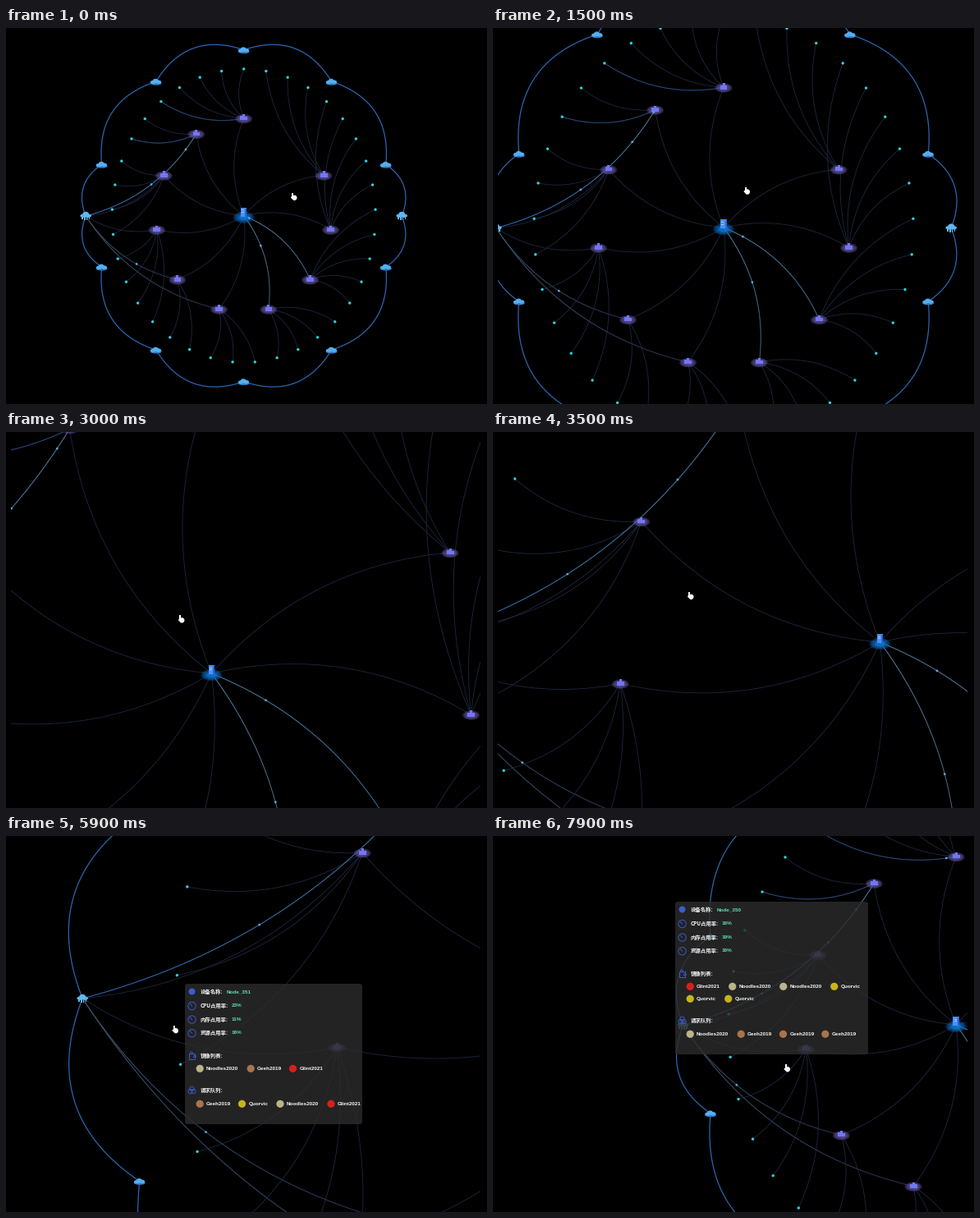
Write a matplotlib script that moves like this. It is 586 px wide and 458 px high and loops after 8000 ms.

```python
import numpy as np
import matplotlib.pyplot as plt
from matplotlib.animation import FuncAnimation
from matplotlib.collections import LineCollection, PolyCollection
from matplotlib.colors import to_rgba
from matplotlib.patches import Circle, FancyBboxPatch, Rectangle
from matplotlib.transforms import Affine2D

W, H, DPI = 586, 458, 100
STEP, FRAMES = 100, 80
PX = 72 / DPI

fig = plt.figure(figsize=(W / DPI, H / DPI), dpi=DPI, facecolor="black")
ax = fig.add_axes([0, 0, 1, 1])
ax.set_xlim(0, W)
ax.set_ylim(H, 0)
ax.axis("off")


# ---- network layout, relative to the hub at scale 1 ----
def ring(n, rx, ry):
    a = 2 * np.pi * np.arange(n) / n
    return np.column_stack([rx * np.sin(a), -ry * np.cos(a)])


def curve(p, q, bend=0.2, n=40):
    """Quadratic curve from p to q, bulging by bend times its length."""
    d = q - p
    c = (p + q) / 2 + bend * np.array([d[1], -d[0]])
    t = np.linspace(0, 1, n)[:, None]
    return p * (1 - t) ** 2 + 2 * c * t * (1 - t) + q * t ** 2


HUB = np.zeros(2)
clouds = ring(10, 182, 202)
nodes = ring(11, 107, 118.6)
leaves = ring(37, 160.5, 178.8)
left, right = np.array([-192.5, 0.3]), np.array([192.5, 0.3])
used = [0, *range(2, 11)]

rim = [*clouds[:3], right, *clouds[3:8], left, *clouds[8:]]
outer = [curve(p, q, 0.4) for p, q in zip(rim, rim[1:] + rim[:1])]

# leaves are shared out clockwise from the top
owner = np.repeat(used[1:] + [0], [3, 5, 5, 4, 3, 2, 4, 4, 2, 5])
fan = [curve(nodes[k], leaves[(j + 1) % 37]) for j, k in enumerate(owner)]
spokes = [curve(HUB, nodes[k]) for k in used]
uplinks = [curve(nodes[k], left) for k in (6, 7, 8, 9, 10)]
faint = fan + spokes + uplinks

TEAL, BLUE, STEEL, NAVY, DIM = "#4d7f99", "#2b68b8", "#3b5468", "#274a7c", "#222b48"
glowing = [(uplinks[4], TEAL, BLUE), (uplinks[1], DIM, STEEL), (uplinks[0], DIM, STEEL),
           (spokes[4], TEAL, STEEL), (spokes[3], TEAL, "#34688f"),
           (fan[32], NAVY, NAVY), (fan[30], NAVY, NAVY)]

# glowing curve, position at start; all run at one speed on screen
pulses = [(0, 0.481), (0, 0.129), (0, -0.047), (1, 0.38), (3, 0.345), (4, 0.06), (5, -0.22)]
SPEED = 8


def lines(color, width, z):
    return ax.add_collection(LineCollection([], colors=color, linewidths=width * PX, zorder=z))


def blend(a, b, n):
    t = np.linspace(0, 1, n)[:, None]
    return np.array(to_rgba(a)) * (1 - t) + np.array(to_rgba(b)) * t


faint_lc = lines("#20273f", 0.85, 1)
outer_lc = lines("#2c66b0", 1.25, 1)
glow_lcs = [lines(blend(a, b, 39), 0.95, 2) for _, a, b in glowing]


# ---- icons: fixed size, made of small polygons ----
def oval(x, y, rx, ry):
    a = np.linspace(0, 2 * np.pi, 25)
    return np.column_stack([x + rx * np.cos(a), y + ry * np.sin(a)])


def rect(x, y, w, h):
    return np.array([(x, y), (x + w, y), (x + w, y + h), (x, y + h)], float)


def icon(points, parts, z=3):
    """Return the places of a repeated icon and its (collection, shape) parts."""
    made = []
    for shape, color, alpha in parts:
        pc = PolyCollection([], facecolors=[to_rgba(color, alpha)],
                            edgecolors="none", zorder=z)
        made.append((ax.add_collection(pc), shape))
    return np.atleast_2d(points), made


def halo(y, rx, color, core):
    """Soft disc seen at an angle, brighter towards the middle."""
    return [(oval(0, y, rx * f, rx * f * 0.55), color if f > 0.6 else core, 0.3)
            for f in np.linspace(1, 0.4, 6)]


cloud = [(oval(0, 2, 7, 2.4), "#2f7ccb", 1)]
cloud += [(oval(x, -1 + 0.5 * abs(x), 3.5, 2.8 - 0.2 * abs(x)), "#56aeee", 1)
          for x in (-3.4, 2.9, -0.5)]
jelly = [(oval(x, -2.4 + 0.7 * abs(x), 3.8, 2.8 - 0.2 * abs(x)), "#62b6f0", 1)
         for x in (-3, 3, 0)]
jelly += [(rect(x - 0.8, 0, 1.6, 5.8 - 0.3 * abs(x)), "#62b6f0", 1)
          for x in np.linspace(-4.4, 4.4, 4)]
town = halo(0.6, 10.6, "#62549c", "#4a45c0")
town += [(rect(x - 1.5, -h, 3, h + 2.2), "#7277f2", 1) for x, h in ((-2.8, 2.8), (0.1, 5), (3, 2.4))]
tower = halo(2, 13, "#0c66bb", "#128ae4")
tower += [(rect(-3.7, -9.8, 7.4, 11), "#4a90fa", 1), (rect(1.7, -9, 2, 10), "#2d66da", 1)]
tower += [(rect(-2.6, y, 3, 1), "#9ccbff", 1) for y in (-7.4, -4.6)]

icons = [icon(leaves, [(oval(0, 0, 1.7, 1.7), "#30d0dc", 1)]), icon(clouds, cloud),
         icon([left, right], jelly), icon(nodes[used], town), icon(HUB, tower, 4)]
pulse_pc = PolyCollection([], facecolors="#5fa8dc", edgecolors="none", zorder=4)
ax.add_collection(pulse_pc)

for x in (5.5 - W, 578):
    ax.add_patch(Rectangle((x, 0), W, H, color="black", lw=0, zorder=5))


# ---- information panel ----
INK, GREEN = "#3b5bd0", "#5fdcae"
# name -> (icon colour, advance)
apps = {"Noodles2020": ("#b9b48a", 62), "Geeh2019": ("#a8744e", 51.3),
        "Glint2021": ("#d81f1f", 51.5), "Quorvic": ("#c9b31c", 46.5)}


class Panel:
    ICON_X, LABEL_X, ITEM_X = 8.5, 18.7, 18.2

    def __init__(self, width, height, name, loads, images, queue):
        self.move = Affine2D()
        self.tr = self.move + ax.transData
        self.parts = []
        self.add(FancyBboxPatch((2, 2), width - 4, height - 4,
                                boxstyle="round,pad=2,rounding_size=3",
                                fc=to_rgba("#2b2b2b", 0.84), ec="none"), 6)
        x = self.ICON_X
        self.disc(x, 9.5, 4, INK)
        self.row(9, "设备名称:", name, 51)
        for i, (what, load) in enumerate(zip(("CPU", "内存", "资源"), loads)):
            y = 26 + 16.6 * i
            self.loop(x, y + 1, 4.7)
            self.stroke([x - 2, x], [y - 1.5, y + 1])
            self.row(y, what + "占用率:", load, 57)
        self.add(Rectangle((x - 4, 85), 7, 7, fc="none", ec=INK, lw=0.9 * PX))
        self.loop(x - 0.5, 84.4, 1.4)
        self.loop(x + 3.4, 88.5, 1.4)
        self.row(87, "镜像列表:")
        for i, names in enumerate(images):
            y = 103 + 15 * i
            self.items(y, names)
        y += 26
        for a in np.radians([90, 210, 330]):
            self.loop(x + 2.2 * np.cos(a), y + 1 - 2.2 * np.sin(a), 2.6)
        self.row(y, "请求队列:")
        self.items(y + 17, queue)

    def add(self, patch, z=7):
        patch.set_transform(self.tr)
        patch.set_zorder(z)
        self.parts.append(ax.add_patch(patch))

    def disc(self, x, y, r, color):
        self.add(Circle((x, y), r, fc=color, ec="none"))

    def loop(self, x, y, r):
        self.add(Circle((x, y), r, fc="none", ec=INK, lw=0.9 * PX))

    def stroke(self, x, y):
        self.parts += ax.plot(x, y, color=INK, lw=0.9 * PX, transform=self.tr, zorder=7)

    def text(self, x, y, s, color="#f2f2f2", font="Liberation Sans"):
        self.parts.append(ax.text(x, y, s, color=color, family=font, size=6.35 * PX,
                                  weight="bold", va="center_baseline",
                                  transform=self.tr, zorder=7))

    def row(self, y, label, value="", x=0):
        self.text(self.LABEL_X, y, label, font="Noto Sans CJK JP")
        self.text(x, y, value, GREEN)

    def items(self, y, names):
        x = self.ITEM_X
        for name in names:
            color, advance = apps[name]
            self.disc(x, y + 0.3, 4.6, color)
            self.text(x + 7.8, y, name)
            x += advance

    def place(self, pos):
        for p in self.parts:
            p.set_visible(pos is not None)
        if pos is not None:
            self.move.clear().translate(*pos)


N, G, F, Q = apps
first = Panel(216, 171, "Node_351", ("23%", "11%", "16%"), [[N, G, F]], [G, Q, N, F])
second = Panel(235, 186, "Node_350", ("16%", "19%", "16%"),
               [[F, N, N, Q], [Q, Q]], [N, G, G, G])

# ---- pointer: gestures drive both the hand and the camera ----
hand = [rect(-2.6, -4.6, 1.9, 7), oval(0.4, 1.4, 3.1, 3.2), oval(-2.4, 1, 1.5, 1.3)]
hand_pc = PolyCollection([], facecolors="white", edgecolors="none", zorder=9)
ax.add_collection(hand_pc)

ZOOM = 1.2
# begin, end, pointer x, y, drag dx, dy, wheel steps (negative zooms out)
gestures = [
    (800, 1000, 309.5, 195.8, 0, 0, 2),
    (2200, 2800, 309.5, 195.8, 0, 0, 4),
    (3050, 3300, 190, 233, 221, -38, 0),
    (3600, 4100, 156, 198, 208, -55.6, 0),
    (4550, 4700, 161.5, 218.4, 0, 0, 1),
    (5300, 6400, 206.5, 233.4, 0, 0, 0),
    (7300, 7600, 360.4, 260.9, 0, 0, -4),
]
stops = [(0, 351, 203)]
for t0, t1, x, y, dx, dy, _ in gestures:
    stops += [(t0, x, y), (t1, x + dx, y + dy)]
stops = np.array(stops + [(7900, 358.5, 280.4)])


def pointer(ms):
    return np.array([np.interp(ms, stops[:, 0], stops[:, k]) for k in (1, 2)])


def camera(ms):
    scale, pos = 1.0, np.array([289.7, 228.7])
    for t0, t1, x, y, dx, dy, steps in gestures:
        pos = pos + np.array([dx, dy]) * np.clip((ms - t0) / (t1 - t0), 0, 1)
        done = np.sum(ms >= np.linspace(t0, t1, abs(steps)))
        f = ZOOM ** (np.sign(steps) * done)
        hot = np.array([x, y])
        scale, pos = scale * f, hot + (pos - hot) * f
    return scale, pos


def travelled(ms):
    """Distance, in layout units, covered at constant screen speed."""
    return sum(SPEED * STEP / 1000 / camera(t)[0] for t in range(0, ms, STEP))


def along(pts, t):
    u = np.linspace(0, 1, len(pts))
    return np.array([np.interp(t, u, pts[:, k]) for k in (0, 1)])


def length(pts):
    return np.hypot(*np.diff(pts, axis=0).T).sum()


def draw(i):
    ms = i * STEP
    scale, pos = camera(ms)

    def view(p):
        return p * scale + pos

    faint_lc.set_segments([view(c) for c in faint])
    outer_lc.set_segments([view(c) for c in outer])
    for lc, (c, _, _) in zip(glow_lcs, glowing):
        v = view(c)
        lc.set_segments(np.stack([v[:-1], v[1:]], axis=1))
    for points, parts in icons:
        at = view(points)
        for pc, shape in parts:
            pc.set_verts([shape + p for p in at])

    gone, dots = travelled(ms), []
    for k, start in pulses:
        c = glowing[k][0]
        t = start + gone / length(c)
        if 0 < t < 1:
            dots.append(oval(0, 0, 1.4, 1.4) + view(along(c, t)))
    pulse_pc.set_verts(dots)

    first.place((218, 180) if 5400 <= ms < 6700 else None)
    slide = 1 - (1 - np.clip((ms - 7300) / 400, 0, 1)) ** 3
    second.place((313 - 91 * slide, 247 - 167 * slide) if ms >= 6700 else None)

    tip = pointer(ms) + (0, 2.4)
    hand_pc.set_verts([part + tip for part in hand])
    return []


anim = FuncAnimation(fig, draw, frames=FRAMES, interval=STEP, repeat=True,
                     repeat_delay=0, blit=False)
plt.show()
```
